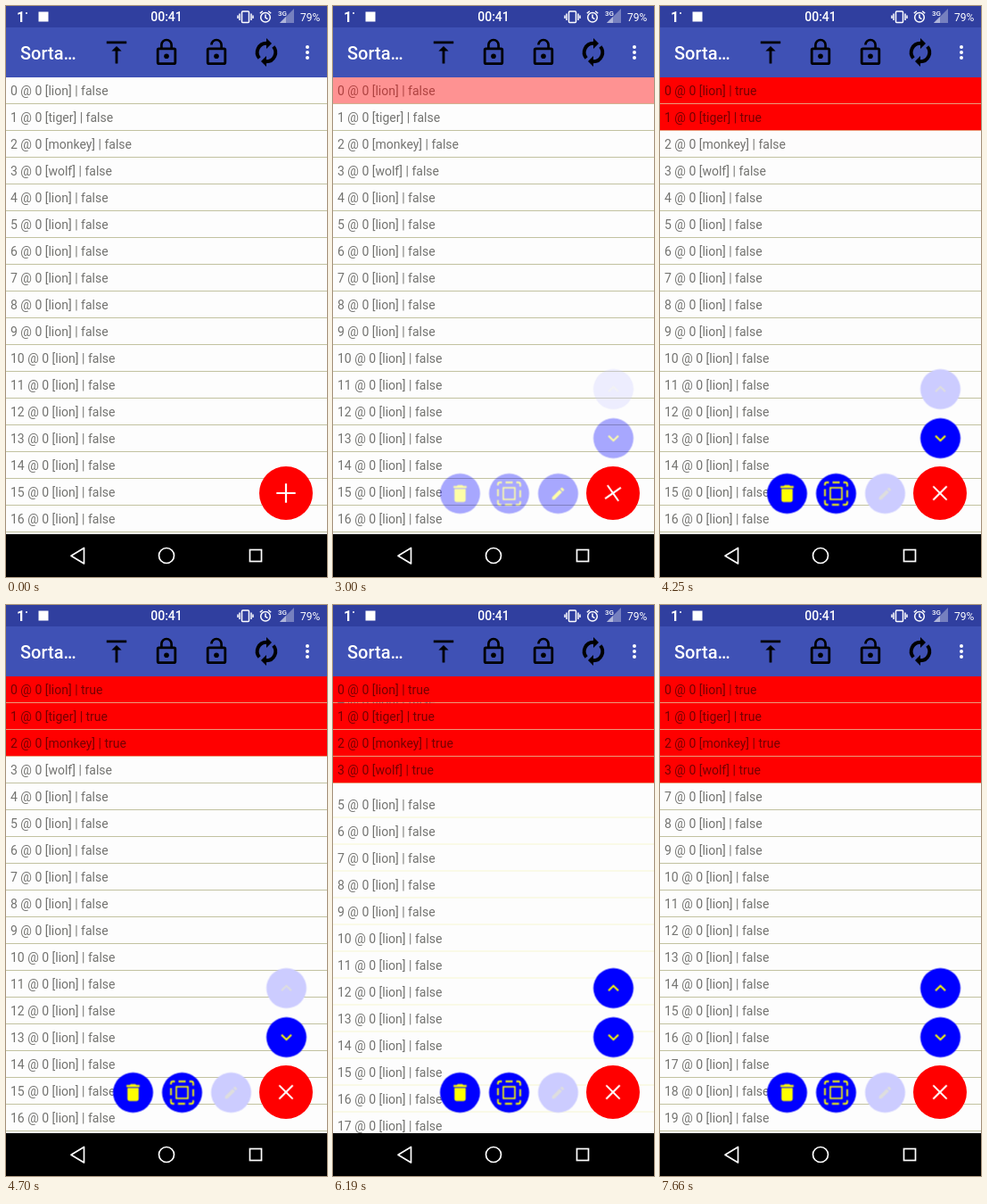
These frames come from a looping animation (360x640 px, 8 s). An HTML page:

```html
<!DOCTYPE html>
<html lang="en">
<head>
<meta charset="utf-8">
<title>Sortable list</title>
<style>
  html, body { margin: 0; width: 100%; height: 100%; overflow: hidden; background: #fdfdfd; }
  body { position: relative; font-family: Roboto, sans-serif; }
  #list { position: absolute; left: 0; top: 80px; width: 360px; height: 512px; overflow: hidden; background: #fdfdfd; }
  .row, .hot { position: absolute; left: 0; width: 360px; font-size: 14px; line-height: 30px; white-space: pre; }
  .row { height: 30px; color: #737370; }
  .hot { height: 29px; color: #750000; background: #f00; overflow: hidden; }
  .row span, .hot span { position: absolute; left: 5px; top: 0; }
  .row i { position: absolute; left: 0; bottom: 0; width: 360px; height: 1px; background: #c2c2a0; }
  svg { position: absolute; left: 0; top: 0; }
  text { font-family: Roboto, sans-serif; fill: #fff; }
  .line { fill: none; stroke: currentColor; }
</style>
</head>
<body>
<div id="list"></div>
<svg width="360" height="640" viewBox="0 0 360 640">
  <!-- status bar -->
  <rect width="360" height="24" fill="#303f9f"/>
  <text x="12" y="18" font-size="16" font-weight="700">1</text>
  <g fill="#fff">
    <circle cx="23" cy="8" r="1"/>
    <rect x="36.5" y="6.5" width="11" height="11"/>
  </g>
  <text x="180" y="17" font-size="14" font-weight="500" text-anchor="middle">00:41</text>
  <g class="line" color="#fff" stroke-width="1.5">
    <rect x="264.5" y="6" width="8" height="12.5" rx="1"/>
    <path d="M262 8.500v7.500M275 8.500v7.500M260 10.500v3.500M277 10.500v3.500"/>
    <circle cx="291" cy="12.700" r="5.300"/>
    <path d="M291 9.500v3.700l2.500 1.500M284.800 8.300l3-2.600M297.200 8.300l-3-2.600"/>
  </g>
  <path d="M307 19L323 3V19Z" fill="#7680bf"/>
  <path d="M307 19L314 12V19Z" fill="#b0b6da"/>
  <text x="305" y="11" font-size="8" font-weight="500">3G</text>
  <text x="330" y="17" font-size="12">79%</text>

  <!-- app bar -->
  <rect y="24" width="360" height="56" fill="#3f51b5"/>
  <text x="16" y="59.500" font-size="20" font-weight="500">Sorta…</text>
  <g color="#000" fill="currentColor">
    <path transform="translate(124 52) scale(1.4)" d="M-4-1h3V9h2V-1h3L0-5ZM-8-9h16v2H-8Z"/>
    <g transform="translate(180 52) scale(1.4)">
      <g id="lock">
        <rect class="line" x="-7" y="-3" width="14" height="12" rx="1" stroke-width="2"/>
        <circle cy="3" r="2"/>
      </g>
      <path class="line" d="M-4-3V-6a4 4 0 0 1 8 0v3" stroke-width="1.900"/>
    </g>
    <g transform="translate(236 52) scale(1.4)">
      <use href="#lock"/>
      <path class="line" d="M-4-6a4 4 0 0 1 8 0v3" stroke-width="1.900"/>
    </g>
    <g transform="translate(292 52) scale(1.4)">
      <g id="arc">
        <path class="line" d="M0-7.300A7.300 7.300 0 0 0-5.600 4.700" stroke-width="2.800"/>
        <path d="M0-11.500L4.300-7.200L0-2.900Z"/>
      </g>
      <use href="#arc" transform="rotate(180)"/>
    </g>
  </g>
  <g fill="#fff">
    <circle cx="338" cy="46" r="2"/><circle cx="338" cy="52" r="2"/><circle cx="338" cy="58" r="2"/>
  </g>

  <!-- navigation bar -->
  <rect y="592" width="360" height="48"/>
  <g class="line" color="#fff" stroke-width="1.700">
    <path d="M87.500 607.500V625L73 616.200Z" stroke-linejoin="round"/>
    <circle cx="180" cy="616" r="8.500"/>
    <rect x="273.500" y="609.500" width="13" height="13"/>
  </g>

  <!-- floating buttons -->
  <g id="up" class="btn" transform="translate(314.500 429.500)">
    <circle r="22.500"/>
    <path class="line" d="M-5.500 2.800L0-2.700L5.500 2.800" stroke-width="2"/>
  </g>
  <g id="down" class="btn" transform="translate(314.500 484.500)">
    <circle r="22.500"/>
    <path class="line" d="M-5.500-2.800L0 2.700L5.500-2.800" stroke-width="2"/>
  </g>
  <g id="edit" class="btn" transform="translate(252.500 546.500)">
    <circle r="22.500"/>
    <path fill="currentColor" transform="scale(.75)" d="M-9 5.250V9h3.750L5.800-2.060L2.060-5.800ZM8.700-5a1 1 0 0 0 0-1.400L6.400-8.700a1 1 0 0 0-1.400 0L3.100-6.900L6.900-3.100Z"/>
  </g>
  <g id="all" class="btn" transform="translate(197.500 546.500)">
    <circle r="22.500"/>
    <rect class="line" x="-12.500" y="-12.500" width="25" height="25" rx="2" stroke-width="1.800" stroke-dasharray="8 4.070" stroke-dashoffset="5.570"/>
    <rect class="line" x="-6.500" y="-6.500" width="13" height="13" stroke-width="1.600"/>
  </g>
  <g id="trash" class="btn" transform="translate(142.500 546.500)">
    <circle r="22.500"/>
    <path fill="currentColor" transform="scale(1.050)" d="M-6 7a2 2 0 0 0 2 2h8a2 2 0 0 0 2-2V-5H-6ZM7-8H3.500l-1-1h-5l-1 1H-7v2H7Z"/>
  </g>
  <g transform="translate(314 546)">
    <circle r="30" fill="#f00"/>
    <path id="plus" class="line" color="#fff" d="M-10.700 0H10.700M0-10.700V10.700" stroke-width="2.200"/>
  </g>
</svg>
<script>
const LOOP = 8000, FADE = 250, ROW = 30, PICKED = 4;
const PICK_AT = [2888, 3740, 4240, 4830];
const MOVE_AT = [6031, 6738, 7350];
const SINE = 'cubic-bezier(.364,0,.636,1)';
const RULE = '#c2c2a0', RULE_MOVING = '#f4f4c4', RULE_PICKED = '#eb9a7a';
const $ = id => document.getElementById(id);

// Each move is [start, end, value, easing]; equal times make a hard change.
function track(el, prop, first, moves) {
  let now = first;
  const keys = [{ offset: 0, [prop]: first }];
  for (const [a, b, value, easing = 'linear'] of moves) {
    keys.push({ offset: a / LOOP, [prop]: now, easing }, { offset: b / LOOP, [prop]: value });
    now = value;
  }
  keys.push({ offset: 1, [prop]: now });
  const run = el.animate(keys, { duration: LOOP, iterations: Infinity });
  run.startTime = document.timeline.currentTime;
}

function add(cls, top, text) {
  const el = document.createElement('div');
  const label = document.createElement('span');
  el.className = cls;
  el.style.top = top + 'px';
  label.textContent = text;
  el.append(label);
  $('list').append(el);
  return el;
}

const animals = ['lion', 'tiger', 'monkey', 'wolf'];
const caption = (i, on) => `${i} @ 0 [${animals[i] || 'lion'}] | ${on}`;

for (let i = 0; i < 21; i++) {
  const row = add('row', i * ROW, caption(i, false));
  const rule = document.createElement('i');
  row.append(rule);
  if (i < PICKED) {
    const t = PICK_AT[i];
    track(rule, 'backgroundColor', RULE, [[t, t + FADE, RULE_PICKED, SINE]]);
    continue;
  }
  // The row just below the picked block slides up beneath it; the rest follow by one.
  let y = 0;
  const shifts = [], tints = [];
  MOVE_AT.forEach((t, k) => {
    const end = t + FADE;
    if (i >= PICKED + k) {
      y -= i === PICKED + k ? ROW * (PICKED + 1) : ROW;
      shifts.push([t, end, `translateY(${y}px)`, SINE]);
    }
    tints.push([t, t, RULE_MOVING], [end, end, RULE]);
  });
  track(row, 'transform', 'translateY(0px)', shifts);
  track(rule, 'backgroundColor', RULE, tints);
}

// The red fades in over the old label, then the new label appears.
PICK_AT.forEach((t, i) => {
  const hot = add('hot', i * ROW, caption(i, true));
  track(hot, 'opacity', 0, [[t, t + FADE, 1, SINE]]);
  track(hot.firstChild, 'opacity', 0, [[t + FADE / 2, t + FADE, 1]]);
});

const ON = ['#00f', '#ff0'], OFF = ['#ccf', '#dedede'];
function paint(id, first, changes = []) {
  const btn = $(id);
  track(btn, 'opacity', 0, [[2860, 3270, 1]]);
  track(btn.querySelector('circle'), 'fill', first[0], changes.map(([t, c]) => [t, t, c[0]]));
  track(btn, 'color', first[1], changes.map(([t, c]) => [t, t, c[1]]));
}
paint('trash', ON);
paint('all', ON);
paint('down', ON);
paint('edit', ON, [[PICK_AT[1], OFF]]);
paint('up', OFF, [[MOVE_AT[0], ON]]);

track($('plus'), 'transform', 'rotate(0deg)', [
  [2860, 3000, 'rotate(55deg)', 'ease-out'],
  [3000, 3270, 'rotate(45deg)', 'ease-in-out']
]);
</script>
</body>
</html>
```
